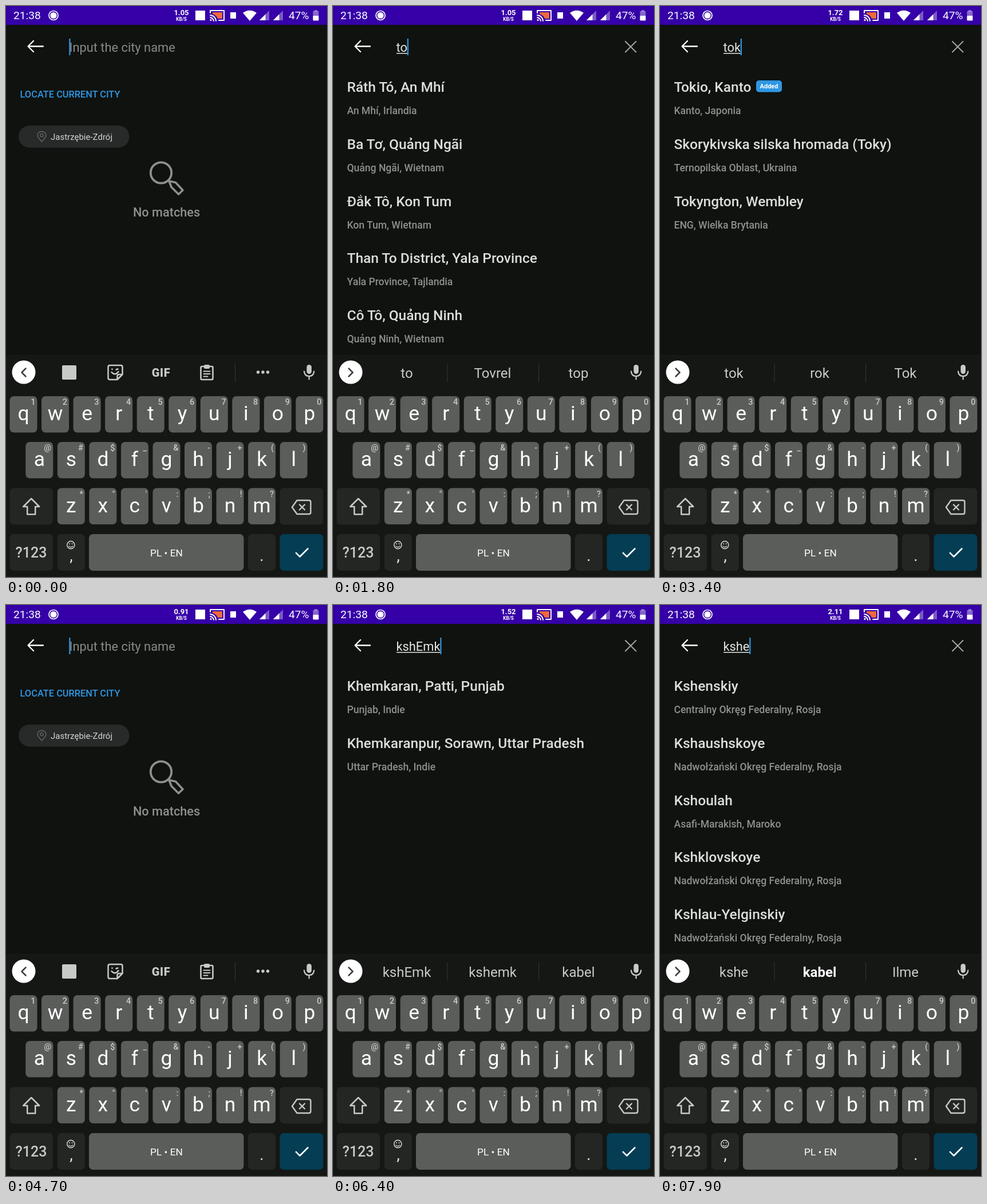
An HTML page for the animation above (8 s loop, 561 by 998 pixels).

```html
<!DOCTYPE html>
<html lang="en">
<head>
<meta charset="utf-8">
<title>City search</title>
<style>
html, body { margin: 0; width: 100%; height: 100%; overflow: hidden; background: #0f120f; }
svg { display: block; width: 100%; height: 100%; font-family: Roboto, sans-serif; }
.mid { text-anchor: middle; }
.med { font-weight: 500; }
.bold { font-weight: 700; }
.line { fill: none; stroke-linecap: round; stroke-linejoin: round; }
</style>
</head>
<body>
<svg id="stage" viewBox="0 0 561 998"></svg>
<script>
const LOOP = 8000;
const GREY = '#8e908e', SOFT = '#c8cac8', BLUE = '#2f97e4';

const el = id => document.getElementById(id);
const rect = (x, y, w, h, fill, r = 0, extra = '') =>
  `<rect x="${x}" y="${y}" width="${w}" height="${h}" rx="${r}" fill="${fill}" ${extra}/>`;
const text = (x, y, size, fill, str, cls = '', extra = '') =>
  `<text x="${x}" y="${y}" font-size="${size}" fill="${fill}" class="${cls}" ${extra}>${str}</text>`;
const line = (d, color, width, extra = '') =>
  `<path class="line" d="${d}" stroke="${color}" stroke-width="${width}" ${extra}/>`;
const dot = (x, y, r, fill, extra = '') => `<circle cx="${x}" cy="${y}" r="${r}" fill="${fill}" ${extra}/>`;
const group = (id, body) => `<g id="${id}">${body}</g>`;
const esc = s => s.replace('&', '&amp;').replace('<', '&lt;');

// Each result: title | subtitle
const LISTS = {
  none: [],
  to: ['Ráth Tó, An Mhí|An Mhí, Irlandia', 'Ba Tơ, Quảng Ngãi|Quảng Ngãi, Wietnam',
    'Đắk Tô, Kon Tum|Kon Tum, Wietnam', 'Than To District, Yala Province|Yala Province, Tajlandia',
    'Cô Tô, Quảng Ninh|Quảng Ninh, Wietnam'],
  tok: ['Tokio, Kanto|Kanto, Japonia', 'Skorykivska silska hromada (Toky)|Ternopilska Oblast, Ukraina',
    'Tokyngton, Wembley|ENG, Wielka Brytania'],
  ks: ['Kansas|KS, Stany Zjednoczone', 'KS Agraharam, Chitvel, Andhra Pradesh|Andhra Pradesh, Indie',
    'Nadezhda KS, Jekaterynburg|Uralski Okręg Federalny, Rosja',
    "Mashinostroitel' KS, Wierchniaja Pyszma|Uralski Okręg Federalny, Rosja",
    'Agrarnik KS, Polewskoj|Uralski Okręg Federalny, Rosja'],
  khem: ['Khemkaran, Patti, Punjab|Punjab, Indie', 'Khemkaranpur, Sorawn, Uttar Pradesh|Uttar Pradesh, Indie'],
  kshe: ['Kshenskiy|Centralny Okręg Federalny, Rosja', 'Kshaushskoye|Nadwołżański Okręg Federalny, Rosja',
    'Kshoulah|Asafi-Marakish, Maroko', 'Kshklovskoye|Nadwołżański Okręg Federalny, Rosja',
    'Kshlau-Yelginskiy|Nadwołżański Okręg Federalny, Rosja']
};

// Tables of [start ms, value]
const TYPED = [[0, ''], [900, 't'], [1390, 'to'], [2190, 'tok'], [3590, 'to'], [3890, 't'], [4240, ''],
  [4900, 'k'], [5190, 'ks'], [5590, 'ksh'], [5890, 'kshE'], [6040, 'kshEm'], [6190, 'kshEmk'],
  [7090, 'kshEm'], [7240, 'kshE'], [7390, 'ksh'], [7690, 'kshe']];
const RESULTS = [[0, 'none'], [1690, 'to'], [2590, 'tok'], [3890, 'to'], [4240, 'none'], [5390, 'ks'],
  [6290, 'khem'], [7690, 'kshe']];
const HINTS = [[0, ''], [900, 't|to|ta'], [1390, 'to|Tovrel|top'], [2190, 'tok|rok|Tok'],
  [3590, 'to|Tovrel|top'], [3890, 't|to|ta'], [4240, ''], [4900, 'k|kto|na'], [5190, 'ks|*ja|na'],
  [5590, 'ksh|*ja|na'], [5890, 'kshE|kshe|kabel'], [6190, 'kshEmk|kshemk|kabel'], [7090, '||'],
  [7890, 'kshe|*kabel|Ilme']];
const SPEED = [[0, '1.05'], [2890, '1.72'], [3890, '0.91'], [5890, '1.52'], [7190, '2.11']];
const UNDERLINE = [[0, true], [7090, false], [7890, true]];
const CAPS = [[0, false], [5740, true], [5890, false]];
// [from, to, key]
const PRESSES = [[790, 900, 't'], [1290, 1390, 'o'], [2090, 2190, 'k'], [3490, 3590, 'del'], [3790, 3890, 'del'],
  [4140, 4290, 'del'], [4790, 4900, 'k'], [5090, 5190, 's'], [5490, 5590, 'h'], [5690, 5790, 'shift'],
  [5800, 5890, 'e'], [5950, 6040, 'm'], [6100, 6190, 'k'],
  [6990, 7090, 'del'], [7150, 7240, 'del'], [7300, 7390, 'del'], [7590, 7690, 'e']];

const KEY = '#5b5d5b', DARK_KEY = '#242624', HELD = '#3b3e3c';
const PITCH = 55.55;
const ROWS = [['qwertyuiop', '1234567890', 6.5, 682], ['asdfghjkl', '@#$_&-+()', 34.3, 762],
  ['zxcvbnm', '*"\':;!?', 89.8, 842.5]];
const keys = {};

function statusBar() {
  const signal = x => `<path d="M${x} 25h17V8z" fill="#fff" opacity=".35"/><path d="M${x} 25h10.5V14.5z" fill="#fff"/>`;
  return rect(0, 0, 561, 33, '#3500a8')
    + text(13, 23, 19.2, '#fff', '21:38')
    + dot(83, 16.5, 8, 'none', 'stroke="#fff" stroke-width="1.7"') + dot(83, 16.5, 5.6, '#fff')
    + text(306.5, 16, 13, '#fff', '', 'mid bold', 'id="speed"')
    + text(306.5, 25.5, 8.2, '#fff', 'KB/S', 'mid bold')
    + rect(331, 8, 17, 17, '#fff')
    + '<path d="M361 11h17v11h-8q-2-6-9-8z" fill="#f0683c"/>'
    + line('M357 12V8h24v17h-9M357 16q9 1 10 10M357 20q5 1 6 6', '#fff', 1.9)
    + dot(358, 24.5, 1.6, '#fff')
    + rect(392, 11, 10, 11, '#fff')
    + '<path d="M414 12q12-8.500 24 0L426 26z" fill="#fff"/>'
    + signal(443) + signal(467)
    + text(494, 23, 19.2, '#fff', '47%')
    + rect(539, 7, 5, 3, '#fff', 0, 'opacity=".4"') + rect(536.5, 9, 10, 8, '#fff', 0, 'opacity=".4"')
    + rect(536.5, 17, 10, 8.5, '#fff', 1);
}

function searchPage() {
  const empty = text(110.5, 80, 21.84, '#888a88', 'Input the city name')
    + rect(0, 100, 561, 1, 'none');
  const nothing = text(24.500, 160, 16.4, BLUE, 'LOCATE CURRENT CITY', 'med')
    + rect(22, 209, 193.5, 38.5, '#272a28', 19.2)
    + line('M62.500 237q-7.500-8-7.500-11a7.500 6.800 0 0 1 15 0q0 3-7.500 11z', '#656765', 1.4)
    + dot(62.500, 226, 2.6, 'none', 'stroke="#656765" stroke-width="1.3"')
    + text(78, 234, 15, '#d4d6d4', 'Jastrzębie-Zdrój')
    + dot(271, 291.5, 18.2, 'none', `stroke="${GREY}" stroke-width="3.8"`)
    + line('M285 306l11.500 2.500 12.500 13.500-7.500 7-12.500-12.500z', GREY, 3.6)
    + text(280.5, 368, 21.7, GREY, 'No matches', 'mid med');
  return line('M65 70.500H39M48 61l-9.500 9.500 9.500 9.500', '#fff', 2.3)
    + group('placeholder', empty) + group('nothing', nothing)
    + text(110.5, 80, 21.84, '#e4e6e4', '', '', 'id="typed"')
    + rect(111, 82, 0, 1.5, '#e4e6e4', 0, 'id="under"')
    + rect(110.5, 57, 2.2, 29, BLUE, 0, 'id="caret"')
    + group('clear', line('M511 62l18.500 18.500M529.500 62L511 80.500', '#a2a4a2', 2))
    + group('results', '');
}

function resultRows(name) {
  const rows = LISTS[name].map((row, i) => {
    const [title, sub] = row.split('|');
    const y = i * 99.8;
    return text(24.5, 150 + y, 24.5, '#dcdedc', title, 'med') + text(24.5, 189 + y, 17.55, GREY, sub, 'med');
  }).join('');
  const badge = rect(168, 130, 45, 20.5, BLUE, 5) + text(190.5, 144, 11, '#fff', 'Added', 'mid bold');
  return rows + (name === 'tok' ? badge : '');
}

function strip() {
  const divider = x => rect(x, 625, 1.2, 32, '#303330');
  const sticker = line('M195 628h6q3 0 3 3v13l-9 9h-13q-3 0-3-3v-19q0-3 3-3zM204 644h-6q-3 0-3 3v6', SOFT, 2.5)
    + line('M185 640q6 7 12-1M186 634.500v.5M196 634.500l-3 1', SOFT, 2.4);
  const clipboard = rect(340.5, 630, 21, 23, 'none', 2, `stroke="${SOFT}" stroke-width="2.6"`)
    + rect(346, 627, 10, 7, SOFT, 2) + line('M345.500 638.500h11M345.500 643h11M345.500 647.500h7', SOFT, 2);
  const tools = line('M34.500 633.500l-7 7 7 7', '#3c3e3c', 2.5)
    + rect(98, 628, 25, 25, SOFT, 2)
    + `<g transform="translate(-6 0)">${sticker}</g>`.replace('translate(-6 0)', 'translate(-.5 0)')
    + text(271, 647.5, 20, SOFT, 'GIF', 'mid', 'font-weight="900" letter-spacing=".6"')
    + clipboard + divider(400)
    + [440.5, 449, 457.5].map(x => dot(x, 640, 2.7, SOFT)).join('');
  const words = line('M27.500 633.500l7 7-7 7', '#3c3e3c', 2.5) + divider(199.5) + divider(359)
    + [129, 279, 429].map((x, i) => text(x, 650, 24, SOFT, '', 'mid', `id="word${i}"`)).join('');
  return dot(31, 640, 20.5, '#fff') + group('tools', tools) + group('words', words)
    + rect(525.5, 627, 8.5, 16, SOFT, 4.2) + line('M521 638.500q1 8.500 8.700 8.500t8.700-8.500M529.700 648v4.500', SOFT, 2.2);
}

function letterKeys() {
  return ROWS.map(([letters, marks, left, y]) => [...letters].map((c, i) => {
    const x = left + i * PITCH;
    keys[c] = { x, y };
    return rect(x, y, 48, 63.5, KEY, 7)
      + text(x + 24, y + 42, 35.5, '#fff', c, 'mid', `id="key-${c}"`)
      + text(x + 45, y + 15, 14.5, SOFT, esc(marks[i]), 'med', 'text-anchor="end"');
  }).join('')).join('');
}

function keyboard() {
  const side = (x, y, w, id = '') => rect(x, y, w, 64, DARK_KEY, 7, id && `id="${id}"`);
  return rect(0, 611, 561, 387, '#141714') + rect(0, 610.5, 561, 1, '#1a1d1a')
    + strip() + letterKeys()
    + side(6.5, 842.5, 75.5, 'shift') + side(478.5, 842.5, 76, 'del')
    + line('M44.200 861l-14 14h7v13.500h14v-13.500h7z', SOFT, 2.5, 'id="arrow"')
    + line('M508.500 864h21q3 0 3 3v18q0 3-3 3h-21l-8.500-12z', SOFT, 2.4)
    + line('M513 871.500l9 9M522 871.500l-9 9', SOFT, 2.4)
    + side(6.5, 923, 75.5) + text(44, 964, 25, SOFT, '?123', 'mid med')
    + side(89.8, 923, 48)
    + dot(113.3, 942, 6.6, 'none', `stroke="${SOFT}" stroke-width="1.6"`)
    + dot(111, 940, 1.1, SOFT) + dot(115.600, 940, 1.1, SOFT) + line('M110 944q3.300 3.500 6.600 0', SOFT, 1.4)
    + text(114, 970, 28, '#e4e6e4', ',', 'mid')
    + rect(145, 923, 270.5, 64, KEY, 7) + text(280.5, 962, 17.3, '#fff', 'PL • EN', 'mid')
    + side(423, 923, 48) + text(447, 970, 28, '#e4e6e4', '.', 'mid')
    + rect(478.5, 923, 76, 64, '#043d54', 7) + line('M507 956l6.500 6.500 14-14', '#fff', 2.6);
}

function popup() {
  return group('popup', rect(-4, -97, 56, 161, '#298399', 5)
    + text(24, -45, 35.5, '#fff', '', 'mid', 'id="popLetter"')
    + [35, 39.3, 43.6].map(x => dot(x, -29, 1.3, '#fff')).join(''));
}

el('stage').innerHTML = rect(0, 0, 561, 998, '#0f120f') + statusBar() + searchPage() + keyboard() + popup();

const stepAt = (table, t) => table.findLast(([start]) => start <= t);
const at = (table, t) => stepAt(table, t)[1];
const show = (id, on) => el(id).setAttribute('display', on ? 'inline' : 'none');
const put = (id, str) => { if (el(id).textContent !== str) el(id).textContent = str; };
let shownList = null;

function render(t) {
  const [since, typed] = stepAt(TYPED, t);
  const list = at(RESULTS, t);
  put('speed', at(SPEED, t));
  put('typed', typed);
  const width = typed ? el('typed').getComputedTextLength() : 0;
  el('under').setAttribute('width', at(UNDERLINE, t) ? width : 0);
  el('caret').setAttribute('x', 110.3 + width);
  show('caret', (t - since) % 1000 < 500);
  show('placeholder', !typed);
  show('clear', typed);
  show('nothing', list === 'none');
  if (list !== shownList) el('results').innerHTML = resultRows(shownList = list);

  const hints = at(HINTS, t);
  show('tools', !hints);
  show('words', hints);
  hints.split('|').forEach((word, i) => {
    const strong = word[0] === '*';
    put('word' + i, strong ? word.slice(1) : word);
    el('word' + i).setAttribute('font-weight', strong ? 700 : 400);
    el('word' + i).setAttribute('fill', strong ? '#fff' : SOFT);
  });

  const caps = at(CAPS, t);
  const cased = c => caps ? c.toUpperCase() : c;
  for (const c in keys) put('key-' + c, cased(c));
  el('arrow').style.fill = caps ? SOFT : 'none';

  const press = PRESSES.find(([from, to]) => t >= from && t < to);
  const held = press ? press[2] : '';
  for (const id of ['shift', 'del']) el(id).setAttribute('fill', held === id ? HELD : DARK_KEY);
  const key = keys[held];
  show('popup', key);
  if (key) {
    el('popup').setAttribute('transform', `translate(${key.x} ${key.y})`);
    put('popLetter', cased(held));
  }
}

const begin = performance.now();
function tick() {
  render((performance.now() - begin) % LOOP);
  requestAnimationFrame(tick);
}
tick();
</script>
</body>
</html>
```
